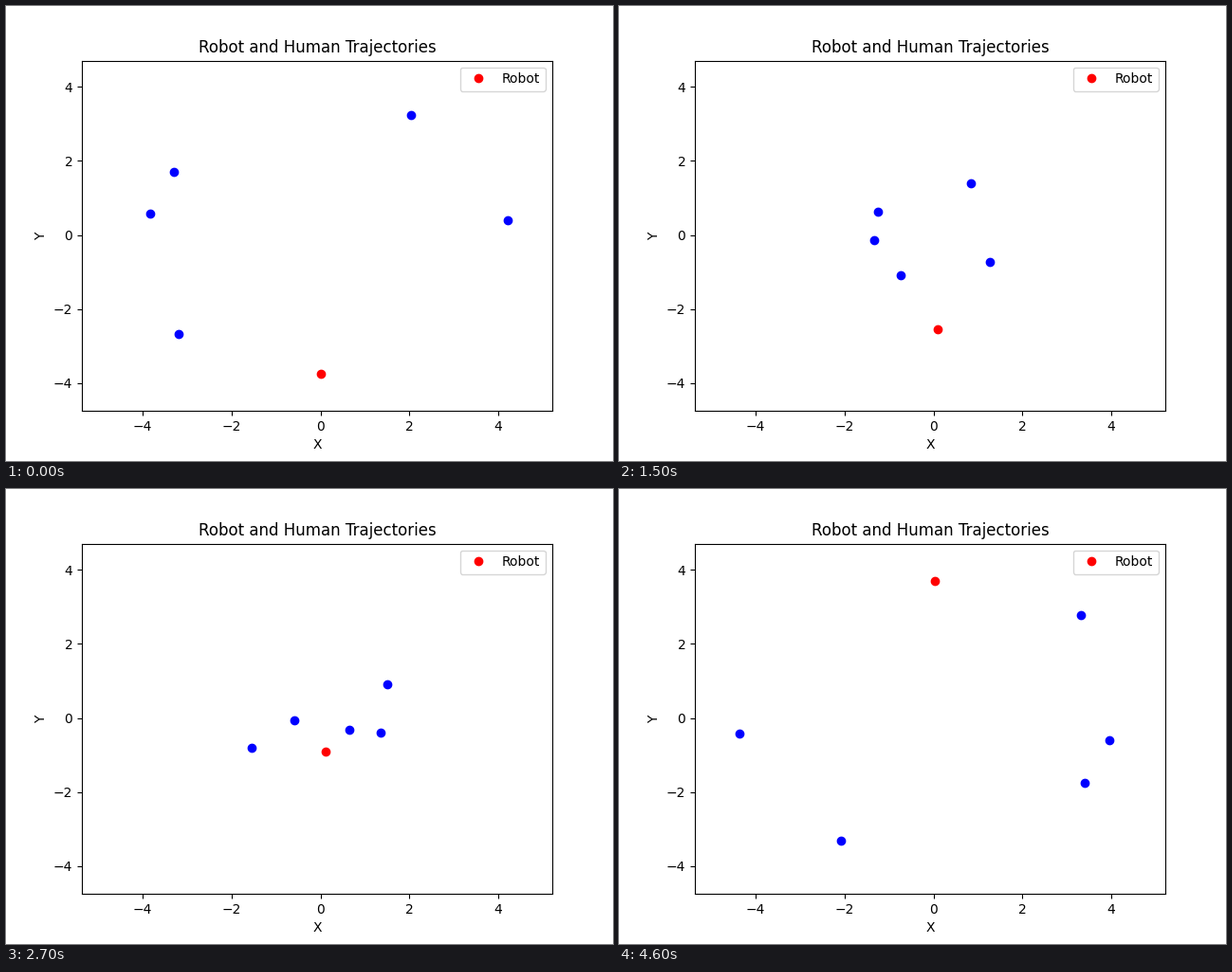
A matplotlib script for the animation above (4.7 s loop, 640 by 480 pixels).

```python
import numpy as np
import matplotlib.pyplot as plt
from matplotlib.animation import FuncAnimation

FRAMES, INTERVAL = 47, 100
DT = 0.25              # simulated seconds per frame
VIA_TIMES = (0, 7, 20)

# goal, two points on the detour, step at which the way is free
HUMANS = [
    ((-2.12, -3.38), (1.59, 2.24), (0.24, 1.01), 23),
    ((3.44, -1.785), (-2.32, 1.17), (-0.61, 0.32), 23),
    ((3.99, -0.60), (-2.76, 0.17), (-0.35, -0.27), 21),
    ((3.33, 2.79), (-2.15, -2.06), (0.27, -0.34), 20),
    ((-4.39, -0.41), (2.89, -0.14), (0.18, -1.06), 20),
]
# the robot advances, waits for the crowd to pass, then drives on: t, x, y
ROBOT = [(0, 0, -3.75), (7, 0, -2.80), (12, 0.05, -2.87), (15, 0.09, -2.54),
         (20, -0.03, -2.24), (27, 0.12, -0.91), (38, 0.12, 1.81), (46, 0.03, 3.70)]


def human_path(goal, via1, via2, free):
    """Swerve along a parabola from the far side of the circle,
    then steer straight to the goal at up to 1 unit/s."""
    goal = np.array(goal)
    curve = np.polyfit(VIA_TIMES, [-0.96 * goal, via1, via2], 2)
    path = list(np.vander(np.arange(free + 1), 3) @ curve)
    while len(path) < FRAMES:
        v = goal - path[-1]
        path.append(path[-1] + DT * v / max(1, np.hypot(*v)))
    return path


def robot_path():
    t, x, y = np.transpose(ROBOT)
    steps = np.arange(FRAMES)
    return np.column_stack([np.interp(steps, t, x), np.interp(steps, t, y)])


humans = np.array([human_path(*h) for h in HUMANS])
robot = robot_path()

fig, ax = plt.subplots(figsize=(6.4, 4.8), dpi=100)
ax.set(xlim=(-5.366, 5.214), ylim=(-4.747, 4.706), xlabel="X", ylabel="Y",
       title="Robot and Human Trajectories")
robot_dot, = ax.plot([], [], "ro", label="Robot")
human_dots, = ax.plot([], [], "bo")
ax.legend(loc="upper right")


def update(i):
    robot_dot.set_data(robot[i:i + 1].T)
    human_dots.set_data(humans[:, i].T)
    return robot_dot, human_dots


anim = FuncAnimation(fig, update, frames=FRAMES, interval=INTERVAL,
                     repeat=True, repeat_delay=0)
plt.show()
```
